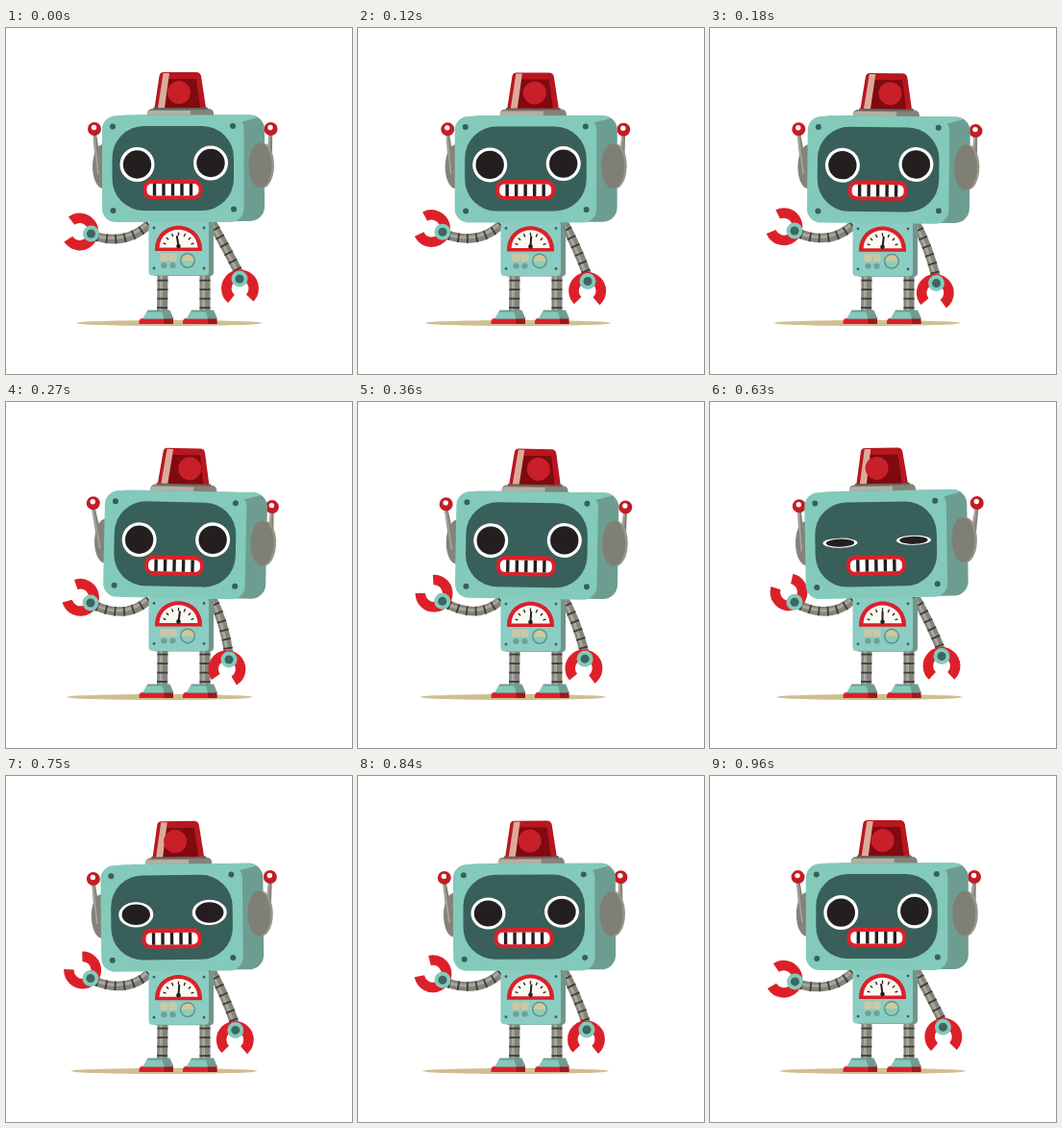
These frames come from a looping animation (360 px wide and 360 px high, 990 ms). An HTML page with a canvas:

```html
<!DOCTYPE html>
<html lang="en">
<head>
<meta charset="utf-8">
<title>Robot</title>
<style>
  html, body { margin: 0; height: 100%; overflow: hidden; background: #fff; }
  canvas { display: block; }
</style>
</head>
<body>
<canvas id="stage" width="360" height="360"></canvas>
<script>
const ctx = document.getElementById('stage').getContext('2d');
const LOOP = 990, STEP = 30, RAD = Math.PI / 180;
const TIMES = [0, 120, 270, 480, 630, 840];
const TEAL = '#83cabb', TEAL_DARK = '#6d9d91', SCREEN = '#395f5a', RED = '#dc2029',
      GREY = '#84837a', GREY_LIGHT = '#a9a79c', INK = '#231f20', TAN = '#d0be92';

// One value per entry of TIMES
const POSE = {
  headX: [0, 0.7, 2, 0.7, -1, -1],
  headY: [0, 0.5, 2, 3.3, 1.9, 0.6],
  tilt: [0, 0.1, 1.2, 0.2, -1, -0.2],
  ballL: [0, 0.5, -4.2, 0.5, 2.5, -1],
  ballR: [0, 0, -1.5, 3.5, 4, -1],
  lampX: [0, 3, 7.5, -0.5, -4, 0],
  bodyY: [0, 0.4, 1.4, 2.6, 1.8, 0.7],
  needle: [-9, 4, 8, -3, 0, 5],
  leftX: [88.5, 88, 88, 87.5, 88, 88],
  leftY: [214, 212.3, 209, 206, 208.2, 212.3],
  leftTurn: [190, 198, 208, 243, 240, 213],
  rightX: [243, 239, 232, 243, 241, 238],
  rightY: [261, 263.5, 268, 265, 264.5, 264],
  rightTurn: [87, 92, 102, 88, 90, 93],
  shadowX: [170, 166.5, 160, 164.5, 166, 164]
};
const EYE_OPEN = [[0, 18], [390, 18], [480, 3.5], [540, 1.5], [630, 5], [720, 12], [840, 16.5], [930, 18], [990, 18]];
const EYE_TILT = [[0, 0], [390, 0], [480, 6], [540, 5], [630, 0], [990, 0]];

function linear(keys, t) {
  const i = keys.findIndex(k => k[0] > t);
  const [t0, a] = keys[i - 1], [t1, b] = keys[i];
  return a + (b - a) * (t - t0) / (t1 - t0);
}

// Periodic cubic through the pose values
function smooth(values, t) {
  const n = TIMES.length;
  const time = i => TIMES[(i + n) % n] + Math.floor(i / n) * LOOP;
  const value = i => values[(i + n) % n];
  const slope = i => (value(i + 1) - value(i - 1)) / (time(i + 1) - time(i - 1));
  let i = n - 1;
  while (TIMES[i] > t) i--;
  const d = time(i + 1) - time(i), u = (t - time(i)) / d, v = 1 - u;
  return v * v * ((1 + 2 * u) * value(i) + u * d * slope(i)) +
         u * u * ((1 + 2 * v) * value(i + 1) - v * d * slope(i + 1));
}

function fill(color, trace) {
  ctx.beginPath();
  trace();
  ctx.fillStyle = color;
  ctx.fill();
}
function stroke(color, width, trace, dash = []) {
  ctx.beginPath();
  trace();
  ctx.strokeStyle = color;
  ctx.lineWidth = width;
  ctx.setLineDash(dash);
  ctx.stroke();
  ctx.setLineDash([]);
}
const box = (color, x, y, w, h, r = 0) => fill(color, () => ctx.roundRect(x, y, w, h, r));
const oval = (color, x, y, rx, ry = rx, turn = 0) =>
  fill(color, () => ctx.ellipse(x, y, rx, ry, turn * RAD, 0, 7));
const poly = (color, ...points) => fill(color, () => {
  for (let i = 0; i < points.length; i += 2) ctx.lineTo(points[i], points[i + 1]);
});
const line = (color, width, x0, y0, x1, y1) => stroke(color, width, () => {
  ctx.moveTo(x0, y0);
  ctx.lineTo(x1, y1);
});

function hose(width, x0, y0, cx, cy, x1, y1) {
  const trace = () => {
    ctx.moveTo(x0, y0);
    ctx.quadraticCurveTo(cx, cy, x1, y1);
  };
  stroke(GREY, width, trace);
  ctx.save();
  ctx.translate(-1.5, -1);
  stroke(GREY_LIGHT, 3, trace);
  ctx.restore();
  stroke('#3d3b39', width, trace, [1.8, 7.7]);
}

function claw(x, y, turn, reach) {
  const a = turn * RAD, gap = 43 * RAD;
  stroke(RED, 10.5, () =>
    ctx.arc(x + reach * Math.cos(a), y + reach * Math.sin(a), 14.2, a + gap, a - gap + 2 * Math.PI));
  oval(TEAL, x, y, 8.5);
  oval('#3c6660', x, y, 4.5);
}

function foot(x) {
  box(RED, x, 302, 35.5, 6, [4, 4, 0, 0]);
  poly('#a3161d', x + 26, 302, x + 35.5, 302, x + 35.5, 308, x + 26, 308);
  poly(TEAL_DARK, x + 9, 293.5, x + 32, 293.5, x + 36, 302.5, x + 4, 302.5);
  poly(TEAL, x + 8, 295.5, x + 24, 295.5, x + 26, 302.5, x + 4, 302.5);
}

function drawBody(needle) {
  box('#74948b', 152, 202, 64, 56, 4);
  box('#8bcdc2', 148.5, 200, 62.5, 57.5, 4);
  for (const x of [154, 206]) for (const y of [208, 250]) oval(SCREEN, x, y, 1.4);

  fill(RED, () => {
    ctx.moveTo(155, 232);
    ctx.bezierCurveTo(154, 197, 205, 197, 204, 232);
    ctx.closePath();
  });
  fill('#fbf9f2', () => {
    ctx.moveTo(159.5, 228.5);
    ctx.bezierCurveTo(161, 203.5, 198, 203.5, 199.5, 228.5);
  });
  for (let a = -75; a <= 75; a += 25) {
    const s = Math.sin(a * RAD), c = Math.cos(a * RAD);
    line(INK, 1.3, 179.5 + 13.5 * s, 228 - 12 * c, 179.5 + 16.5 * s, 228 - 15.5 * c);
  }
  const n = needle * RAD;
  line(INK, 2, 179.5, 227, 179.5 + 11 * Math.sin(n), 227 - 11 * Math.cos(n));
  oval(INK, 179.5, 227, 2.3);

  for (const x of [160.5, 169.5]) {
    box('#cfc6a2', x, 234.5, 8, 8, 1);
    box('#6fa096', x + 0.8, 244, 6.4, 6, 3);
  }
  oval('#5c9488', 189, 242, 8);
  oval('#8fcbbd', 189, 242, 6.5);
  fill('#d3c799', () => ctx.arc(189, 242, 6.5, Math.PI, 0));
}

function antenna(x, y, baseX, baseY) {
  poly(GREY, x - 1.8, y + 4, x + 1.8, y + 4, baseX + 3.5, baseY, baseX - 3.5, baseY);
  line(GREY_LIGHT, 1.6, x - 0.8, y + 4, baseX - 1.5, baseY);
  oval('#c41c25', x, y, 7);
  oval('#fff', x - 0.5, y - 1.5, 2.7);
}

function drawLamp(shift) {
  box(GREY, 147, 84, 69, 11, [5, 5, 0, 0]);
  box('#b3b0a4', 147, 86, 45, 9, [4, 0, 0, 0]);
  box('#66645e', 153, 82.5, 57, 2.5, 1);
  fill('#b8171f', () => {
    ctx.moveTo(154.5, 83);
    ctx.lineTo(159.5, 50);
    ctx.quadraticCurveTo(160, 46, 164, 46);
    ctx.lineTo(198, 46);
    ctx.quadraticCurveTo(202, 46, 203, 50);
    ctx.lineTo(208, 83);
  });
  poly('#7f0a10', 169, 53, 198, 53, 202, 83, 165, 83);
  poly('#dbab9c', 163.5, 47, 170, 47, 165, 83, 158, 83);
  oval('#c81f28', 180 + shift, 67, 12);
}

function drawMouth() {
  box(RED, 142.5, 157.5, 62, 21, 9);
  ctx.save();
  ctx.beginPath();
  ctx.roundRect(146.5, 162, 54, 12.5, 5);
  ctx.clip();
  box('#fff', 146, 161, 56, 15);
  for (let i = -2; i <= 2; i++) box(INK, 171.8 + i * 9.5, 161, 3.4, 15);
  ctx.restore();
}

function drawEyes(open, tilt) {
  const drop = (18 - open) * 0.16;
  for (const [x, y, turn] of [[136.5, 142, -tilt], [213, 140.5, tilt]]) {
    oval('#fff', x, y + drop, 18, open, turn);
    oval(INK, x, y + drop, 14.7, open * 0.815, turn);
  }
}

function drawHead(p, t) {
  ctx.save();
  ctx.translate(174 + p.headX, 147 + p.headY);
  ctx.rotate(p.tilt * RAD);
  ctx.translate(-174, -147);

  oval(GREY, 101, 144, 11, 23);
  antenna(92 + p.ballL, 105, 97.5, 152);
  antenna(275.5 + p.ballR, 105, 273, 150);
  drawLamp(p.lampX);

  box(TEAL_DARK, 122, 90.5, 147, 110.5, 15);
  poly(TEAL, 110, 92, 124, 90.5, 255, 90.5, 263, 93, 244, 98);
  box(TEAL, 100, 91.5, 147.5, 110.5, 14);
  box(SCREEN, 110.5, 102, 126.5, 88, 33);
  for (const [x, y] of [[111, 102.5], [236, 102], [111.5, 190], [237, 188.5]]) oval(SCREEN, x, y, 3);

  oval('#98968b', 267, 143, 12, 23.5);
  oval('#807f75', 264.5, 143, 12, 23.5);
  drawEyes(linear(EYE_OPEN, t), linear(EYE_TILT, t));
  drawMouth();
  ctx.restore();
}

function draw(t) {
  const p = {};
  for (const key in POSE) p[key] = smooth(POSE[key], t);

  ctx.clearRect(0, 0, 360, 360);
  oval(TAN, p.shadowX, 307, 97, 3);
  hose(11, 163, 252, 163, 275, 162.5, 297);
  hose(11, 207, 252, 207, 275, 207, 297);
  foot(138.5);
  foot(184);

  hose(9.5, 149, 204 + p.bodyY, 126, 226 + p.bodyY / 2, p.leftX + 5, p.leftY + 3);
  claw(p.leftX, p.leftY, p.leftTurn, 12);
  hose(9.5, 213, 200 + p.bodyY, 228 + (p.rightX - 238) * 0.1, 228, p.rightX, p.rightY - 5);
  claw(p.rightX, p.rightY, p.rightTurn, 10);

  ctx.save();
  ctx.translate(0, p.bodyY);
  drawBody(p.needle);
  ctx.restore();
  drawHead(p, t);
}

const start = performance.now();
function tick() {
  const t = Math.max(0, performance.now() - start) % LOOP;
  draw(Math.floor(t / STEP) * STEP);
  requestAnimationFrame(tick);
}
tick();
</script>
</body>
</html>
```
